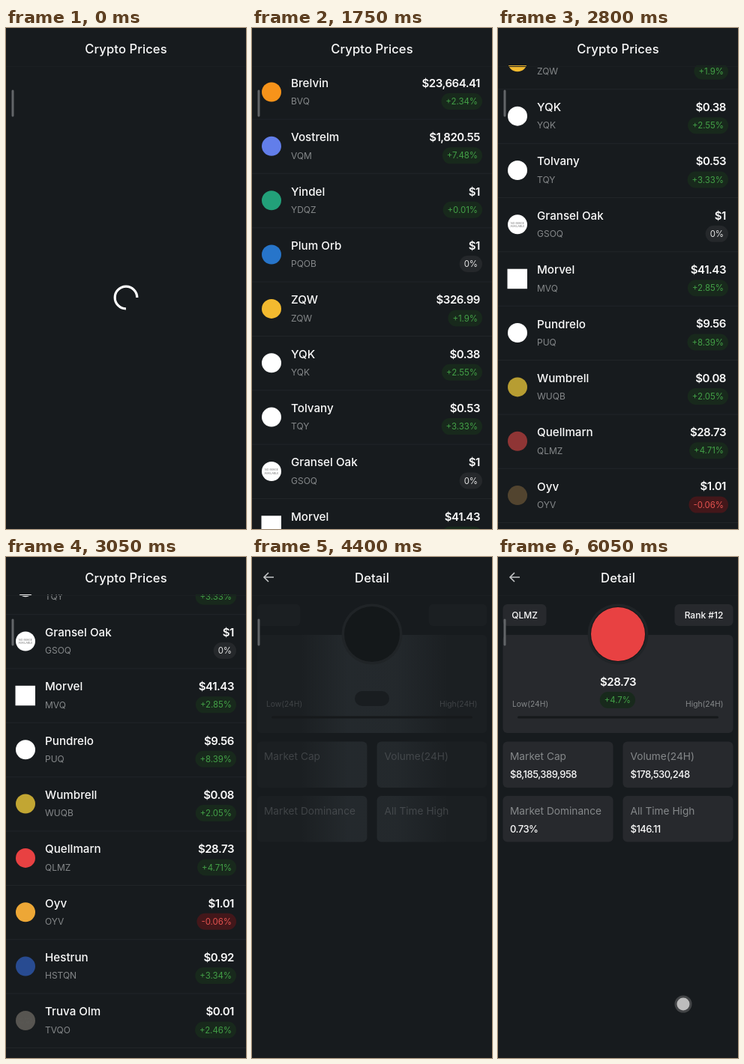
Recreate the animation shown at these times as an HTML page with a canvas. Size 320 by 669 pixels, loop 6.1 s.

```html
<!DOCTYPE html>
<html lang="en">
<head>
<meta charset="utf-8">
<title>Crypto Prices</title>
<style>
html, body { margin: 0; height: 100%; overflow: hidden; background: #171b1e; }
canvas { display: block; width: 320px; height: 669px; }
</style>
</head>
<body>
<canvas id="stage"></canvas>
<script>
const LOOP = 6100, W = 320, H = 669, PITCH = 72.35;
const BG = '#171b1e', CARD = '#27292d', WHITE = '#fafafa', GREY = '#85888a';

// name, ticker, price, change, icon colour, icon kind
const coins = [
  ['Brelvin', 'BVQ', '$23,664.41', '+2.34%', '#f7931a'],
  ['Vostrelm', 'VQM', '$1,820.55', '+7.48%', '#627eea'],
  ['Yindel', 'YDQZ', '$1', '+0.01%', '#22a079'],
  ['Plum Orb', 'PQOB', '$1', '0%', '#2775ca'],
  ['ZQW', 'ZQW', '$326.99', '+1.9%', '#f3ba2f'],
  ['YQK', 'YQK', '$0.38', '+2.55%', '#fff'],
  ['Tolvany', 'TQY', '$0.53', '+3.33%', '#fff'],
  ['Gransel Oak', 'GSOQ', '$1', '0%', '#fff', 'none'],
  ['Morvel', 'MVQ', '$41.43', '+2.85%', '#fff', 'square'],
  ['Pundrelo', 'PUQ', '$9.56', '+8.39%', '#fff'],
  ['Wumbrell', 'WUQB', '$0.08', '+2.05%', '#c2a633'],
  ['Quellmarn', 'QLMZ', '$28.73', '+4.71%', '#e84142'],
  ['Oyv', 'OYV', '$1.01', '-0.06%', '#f5ac37'],
  ['Hestrun', 'HSTQN', '$0.92', '+3.34%', '#2a66e3'],
  ['Truva Olm', 'TVQO', '$0.01', '+2.46%', '#fff', 'none'],
  ['Ilquora', 'IQO', '$9.04', '+8.22%', '#f3e6eb'],
  ['GWOX', 'GWX', '$0.07', '+1.27%', '#d8d8d8']
];

// time, offset, speed
const scrollKeys = [
  [2000, 0, 0], [2500, 173, .55], [2800, 329, .6], [3350, 577, .03], [3600, 580, 0]
];

const canvas = document.getElementById('stage');
const ratio = window.devicePixelRatio || 1;
canvas.width = W * ratio;
canvas.height = H * ratio;
const ctx = canvas.getContext('2d');
ctx.scale(ratio, ratio);

const ramp = (t, from, to) => Math.min(1, Math.max(0, (t - from) / (to - from)));
const ease = p => p * p * (3 - 2 * p);

function scrollAt(t) {
  if (t <= scrollKeys[0][0]) return 0;
  for (let i = 1; i < scrollKeys.length; i++) {
    const [t0, y0, v0] = scrollKeys[i - 1], [t1, y1, v1] = scrollKeys[i];
    if (t > t1) continue;
    const d = t1 - t0, p = (t - t0) / d, q = 1 - p;
    return q * q * (1 + 2 * p) * y0 + p * p * (3 - 2 * p) * y1
      + d * p * q * (q * v0 - p * v1);
  }
  return scrollKeys[scrollKeys.length - 1][1];
}

function faded(alpha, draw) {
  if (alpha <= 0) return;
  ctx.save();
  ctx.globalAlpha *= alpha;
  draw();
  ctx.restore();
}

// y is the middle of the capitals
function text(str, x, y, size, color, { weight = 400, align = 'left', gap = 0 } = {}) {
  ctx.font = `${weight} ${size}px Inter, "Open Sans", sans-serif`;
  ctx.letterSpacing = gap + 'px';
  ctx.textAlign = align;
  ctx.fillStyle = color;
  ctx.fillText(str, x, y + size * .36);
}

function box(x, y, w, h, r, color) {
  ctx.fillStyle = color;
  ctx.beginPath();
  ctx.roundRect(x, y, w, h, r);
  ctx.fill();
}

function disc(x, y, r, color) {
  ctx.fillStyle = color;
  ctx.beginPath();
  ctx.arc(x, y, r, 0, 7);
  ctx.fill();
}

function changePill(str, right, y) {
  const [back, ink] = str[0] === '+' ? ['#18291c', '#43a047']
    : str[0] === '-' ? ['#43171a', '#e5534f'] : ['#25282b', '#e4e4e4'];
  ctx.font = '400 11.4px Inter, sans-serif';
  ctx.letterSpacing = '0px';
  const w = ctx.measureText(str).width + 12;
  box(right - w, y - 11, w, 22, 11, back);
  text(str, right - 6, y, 11.4, ink, { align: 'right' });
}

function coinIcon(color, kind, y) {
  if (kind === 'square') return box(12.5, y - 13, 26.5, 26.5, 0, color);
  disc(26, y, 13, color);
  if (kind === 'none') {
    text('NO IMAGE', 26, y - 2, 3.6, '#777', { align: 'center' });
    text('AVAILABLE', 26, y + 2.5, 3.6, '#777', { align: 'center' });
  }
}

function list(t) {
  const offset = scrollAt(t);
  ctx.beginPath();
  ctx.rect(0, 50, W, H);
  ctx.clip();
  coins.forEach(([name, ticker, price, change, color, kind], i) => {
    const y = 73.5 + i * PITCH - offset;
    if (y < -10 || y > H + 30) return;
    const start = i < 9 ? 1100 + 40 * i : 2400 + 120 * (i - 9);
    const shown = ramp(t, start, start + 300);
    faded(1 - shown, () => disc(26, y + 12, 13, '#3d3931'));
    faded(shown, () => coinIcon(color, kind, y + 12));
    text(name, 52, y, 15.2, WHITE, { weight: 500 });
    text(ticker, 52, y + 24.5, 12, GREY);
    text(price, 304, y, 15, WHITE, { weight: 600, align: 'right', gap: -.45 });
    changePill(change, 307, y + 24.5);
    box(0, y + 48, W, 1, 0, '#212528');
  });
}

function spinner(t) {
  const turn = t / 1000 * Math.PI * 2;
  ctx.strokeStyle = '#fff';
  ctx.lineWidth = 3.2;
  ctx.beginPath();
  ctx.arc(160, 360, 14.8, turn + Math.PI / 2, turn + Math.PI * 2);
  ctx.stroke();
}

const cards = [
  [6.5, 63, 58, 29], [235.5, 63, 78, 29], [6.5, 104, 307, 131],
  [6.5, 246.5, 147, 61.5], [166.5, 246.5, 147, 61.5],
  [6.5, 319, 147, 61.5], [166.5, 319, 147, 61.5]
];
const facts = [
  ['Market Cap', '$8,185,389,958', 16, 266], ['Volume(24H)', '$178,530,248', 176.5, 266],
  ['Market Dominance', '0.73%', 16, 339], ['All Time High', '$146.11', 176.5, 339]
];

function detail(t) {
  const lit = ease(ramp(t, 5000, 5450));
  const fade = ramp(t, 3950, 4400);
  const values = ramp(t, 5250, 5600);
  const glow = ctx.createLinearGradient(0, 0, W, 0);
  [0, .055, .05, 0].forEach((a, i) =>
    glow.addColorStop([.2, .4, .6, .82][i], `rgba(190,215,230,${a})`));

  faded(fade * (.3 + .7 * lit), () => cards.forEach(c => box(...c, 6, CARD)));
  faded(fade * (1 - lit), () => cards.slice(2).forEach(c => box(...c, 6, glow)));
  faded(fade, () => {
    disc(160, 103, 40.5, '#202427');
    disc(160, 103, 37, '#14181a');
    box(26, 212.5, 268, 3, 1.5, '#16191b');
    faded(1 - values, () => box(137, 179, 46, 20, 10, '#191d20'));
  });
  faded(fade * (.35 + .65 * lit), () => {
    text('Low(24H)', 19, 196, 10.3, GREY);
    text('High(24H)', 300.5, 196, 10.3, GREY, { align: 'right' });
    facts.forEach(([label, , x, y]) => text(label, x, y, 13.7, GREY));
  });
  faded(values, () => {
    const [, ticker, price, , color] = coins[11];
    text(ticker, 35.5, 78, 12, WHITE, { weight: 500, align: 'center' });
    text('Rank #12', 274.5, 78, 12, WHITE, { weight: 500, align: 'center' });
    text(price, 160, 167, 15, WHITE, { weight: 600, align: 'center', gap: -.45 });
    changePill('+4.7%', 183, 191);
    facts.forEach(([, value, x, y]) =>
      text(value, x, y + 24, 13, WHITE, { weight: 500, gap: -.5 }));
    faded(ramp(t, 5650, 5900), () => disc(160, 103, 36, color));
  });
}

function backArrow() {
  ctx.strokeStyle = '#c4c6c7';
  ctx.lineWidth = 1.6;
  ctx.beginPath();
  ctx.moveTo(29, 27);
  ctx.lineTo(16.5, 27);
  ctx.moveTo(22, 21);
  ctx.lineTo(16, 27);
  ctx.lineTo(22, 33);
  ctx.stroke();
}

function touch(x, y, alpha) {
  faded(alpha, () => {
    disc(x, y, 11.5, 'rgba(150,150,150,.35)');
    disc(x, y, 8.5, '#bdbdbd');
  });
}

function draw(t) {
  ctx.fillStyle = BG;
  ctx.fillRect(0, 0, W, H);

  const swap = ramp(t, 3950, 4400);
  if (t < 900) spinner(t);
  faded(ramp(t, 900, 1250) * (1 - swap), () => list(t));
  if (swap) detail(t);

  const title = { weight: 500, align: 'center', gap: .1 };
  box(0, 51, W, 1, 0, '#1b1f22');
  faded(1 - swap, () => text('Crypto Prices', 160, 28, 16.6, WHITE, title));
  faded(swap, () => {
    text('Detail', 160, 28, 16.6, WHITE, title);
    backArrow();
  });
  box(7.5, 82.5, 3, 36, 1.5, '#626568');

  touch(287, 448 - scrollAt(t), ramp(t, 1950, 2000) * (1 - ramp(t, 2550, 2620)));
  touch(250, 304, ramp(t, 3700, 3750) * (1 - ramp(t, 3900, 3970)));
  touch(280 - 33 * ease(ramp(t, 5850, 6050)), 597, ramp(t, 5800, 5850));
}

function frame(now) {
  draw(now % LOOP);
  requestAnimationFrame(frame);
}
requestAnimationFrame(frame);
</script>
</body>
</html>
```
